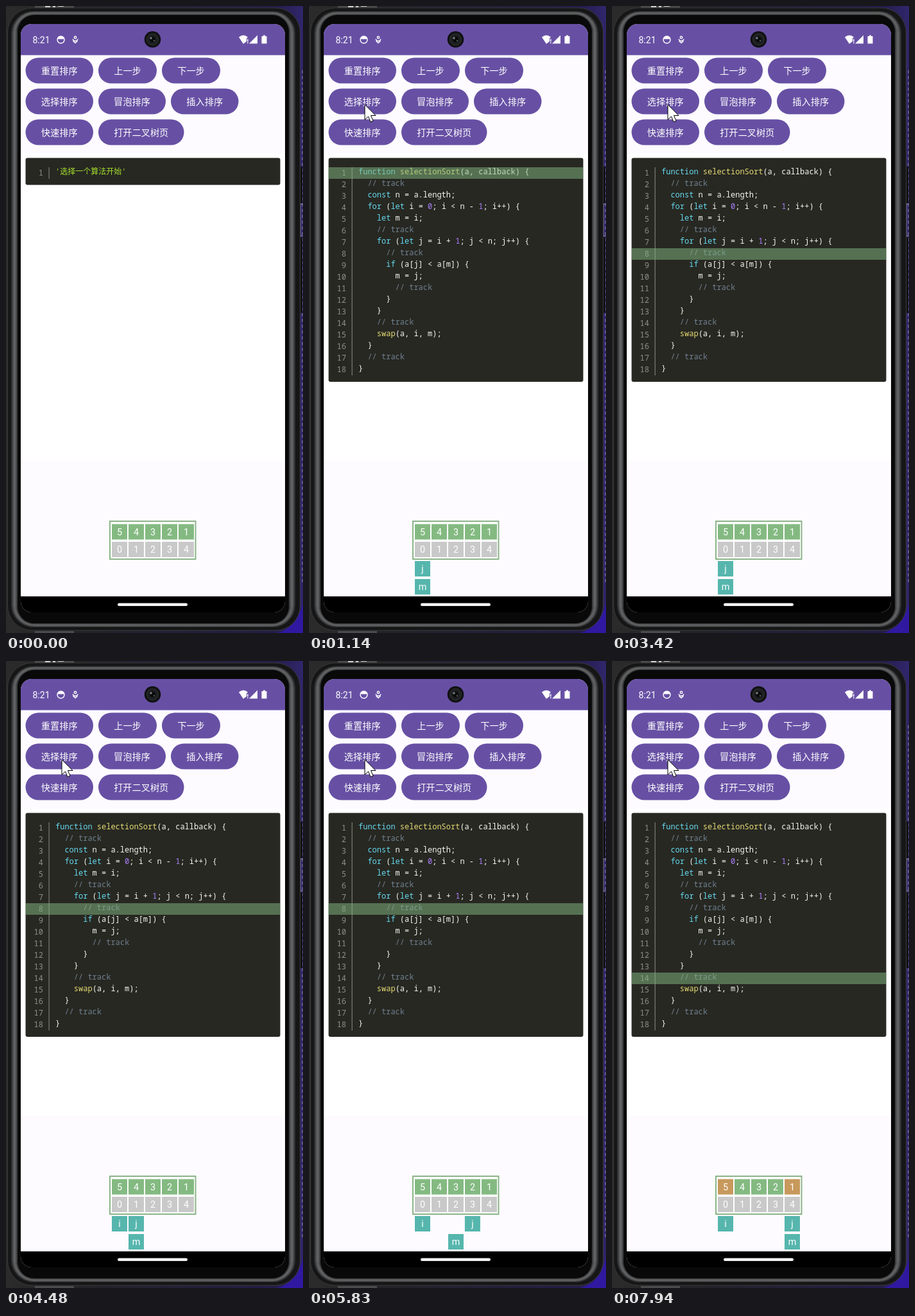
Write an HTML page that moves like this. It is 463x976 px and loops after 8 s.

```html
<!DOCTYPE html>
<html lang="zh">
<head>
<meta charset="utf-8">
<style>
html, body { margin: 0; width: 100%; height: 100%; overflow: hidden; background: #24222f; }
svg { display: block; width: 463px; height: 976px; }
text { white-space: pre; font-family: Roboto, "Noto Sans CJK SC", sans-serif; fill: #fff; }
.label { font-size: 14.2px; text-anchor: middle; font-family: "Noto Sans CJK SC", "Noto Sans CJK", sans-serif; }
.cell { font-size: 14.4px; text-anchor: middle; }
.code { font: 12px "Noto Sans Mono", "Noto Sans CJK SC", monospace; fill: #f8f8f2; }
.num { font: 12px "Noto Sans Mono", monospace; fill: #8f908a; text-anchor: end; }
.comment { fill: #708090; }
.keyword { fill: #66d9ef; }
.call { fill: #e6db74; }
.digit { fill: #ae81ff; }
.string { fill: #a6e22e; }
</style>
</head>
<body>
<svg viewBox="0 0 463 976">
  <defs>
    <linearGradient id="desk" x1="0" y1="0" x2="1" y2="0">
      <stop offset="0" stop-color="#2b2b2b"/><stop offset=".25" stop-color="#232327"/>
      <stop offset=".9" stop-color="#231c48"/><stop offset="1" stop-color="#30266c"/>
    </linearGradient>
    <clipPath id="screen"><rect x="23" y="28" width="412" height="916" rx="17"/></clipPath>
    <clipPath id="press"><rect x="30.500" y="128.500" width="105.500" height="40" rx="20"/></clipPath>
  </defs>

  <!-- desktop and phone body -->
  <rect width="463" height="976" fill="url(#desk)"/>
  <path d="M45 0h61v3h-61zM45 973h61v3h-61z" fill="#4b4b4d"/>
  <path d="M61 0h8v2h-8zM73 0h4v2h-4zM81 0h9v1h-9z" fill="#d0d0d0"/>
  <path d="M463 930v46h-40q30-8 40-46z" fill="#3018a0"/>
  <path d="M462 100V900" stroke="#6c6790" stroke-width="1.500" stroke-dasharray="5 4"/>
  <path d="M457 250h5v57h-5zM457 360h5v118h-5z" fill="#111215"/>
  <path d="M463 308h-4v50h4" fill="none" stroke="#8d8999"/>
  <rect x="2.500" y="3" width="456" height="969" rx="38" fill="#161617" stroke="#3a3a3b"/>
  <g id="rim" fill="none"></g>
  <rect x="18" y="14" width="423" height="947" rx="26" fill="#090909"/>

  <g clip-path="url(#screen)">
    <rect x="23" y="28" width="412" height="916" fill="#fdfbff"/>
    <rect x="23" y="230" width="412" height="478" fill="#fff"/>
    <rect x="23" y="28" width="412" height="48.500" fill="#6750a4"/>
    <rect x="23" y="919" width="412" height="26" fill="#000"/>
  </g>
  <rect x="174" y="929.500" width="109" height="4.500" rx="2.200" fill="#f4f4f4"/>

  <!-- status bar -->
  <text x="41.500" y="58" font-size="14">8:21</text>
  <g fill="none" stroke="#fff" stroke-width="1.400">
    <circle cx="85.500" cy="52.500" r="5.500"/>
    <path d="M81 50.500h9M82 48.500h7" stroke-width="2"/>
    <circle cx="108" cy="49" r="1.700"/>
    <path d="M104 51.500q1 3 4 3t4-3M104.500 54.500l3.500 3 3.500-3"/>
  </g>
  <path d="M363 48.500q7-6 14 0l-2 2v4.500l-5 4zM376 51.500h1.500v4h-1.500zM376 56.500h1.500v1.700h-1.500zM379 58.500L392 45.500V58.500zM398.500 47h2.500V45.500h3v1.500h2.500V58.500h-8z" fill="#fff"/>
  <circle cx="228.500" cy="52" r="12.800" fill="#101112"/>
  <circle cx="228.500" cy="52" r="9" fill="#1d1f20" stroke="#303234"/>
  <circle cx="228.500" cy="52" r="4.500" fill="#090a0b"/>
  <circle cx="226" cy="50" r="1.700" fill="#7d8487"/>
  <circle cx="231" cy="54" r="1.200" fill="#50585b"/>

  <g id="buttons"></g>
  <circle id="ripple" cx="88" cy="153" fill="#fff" clip-path="url(#press)"/>

  <!-- code panel -->
  <rect id="panel" x="30.500" y="236.500" width="397" rx="3" fill="#272822"/>
  <rect id="gutter" x="66.500" y="251" width="1.300" fill="#777872"/>
  <g id="intro">
    <text class="num" x="58" y="264">1</text>
    <text class="code string" x="77" y="262">'选择一个算法开始'</text>
  </g>
  <g id="listing"></g>
  <rect id="mark" x="30.500" width="397" height="18" fill="#84ba82" fill-opacity=".5"/>

  <!-- array -->
  <rect x="162" y="802" width="133.500" height="59" fill="#fff" stroke="#8ab387" stroke-width="2"/>
  <g id="cells"></g>
  <g id="pointers"></g>

  <path id="cursor" d="M0 0V23.500L5.500 18.500 9 27 13 25.300 9.500 17H17z" fill="#fff" stroke="#000" stroke-linejoin="round"/>
</svg>
<script>
const $ = id => document.getElementById(id);
const LOOP = 8000, CODE_AT = 1070, MOVE = 270;
const GREEN = [132, 186, 130], ORANGE = [200, 153, 92];

const source = `function selectionSort(a, callback) {
  // track
  const n = a.length;
  for (let i = 0; i < n - 1; i++) {
    let m = i;
    // track
    for (let j = i + 1; j < n; j++) {
      // track
      if (a[j] < a[m]) {
        m = j;
        // track
      }
    }
    // track
    swap(a, i, m);
  }
  // track
}`;

// [time, highlighted line, pointer that advances]
const steps = [
  [CODE_AT, 1], [1680, 2], [2620, 6], [3420, 8, 'j'], [3950, 11, 'm'],
  [4480, 8, 'j'], [5020, 11, 'm'], [5570, 8, 'j'], [6100, 11, 'm'],
  [6650, 8, 'j'], [7190, 11, 'm'], [7740, 14]
];

// [time, x, y]
const path = [[190, 349, 846], [330, 255, 630], [470, 125, 340], [600, 70, 205], [740, 87, 153.5]];

const clamp = v => Math.max(0, Math.min(1, v));
const ease = v => (v = clamp(v), v * v * (3 - 2 * v));
const escape = s => s.replace(/</g, '&lt;');

function colour(line) {
  const token = /(\/\/.*)|\b(function|const|let|for|if)\b|(\w+(?=\())|\b(\d+)\b/g;
  const kinds = ['comment', 'keyword', 'call', 'digit'];
  return escape(line).replace(token, (s, ...groups) =>
    `<tspan class="${kinds[groups.slice(0, 4).findIndex(Boolean)]}">${s}</tspan>`);
}

function button(x, y, width, label) {
  return `<rect x="${x}" y="${y}" width="${width}" height="40" rx="20" fill="#6750a4"/>
    <text class="label" x="${x + width / 2}" y="${y + 25.5}">${label}</text>`;
}

function cell(x, y, label, fill, id = '') {
  return `<g id="${id}"><rect x="${x}" y="${y}" width="24" height="24" fill="${fill}"/>
    <text class="cell" x="${x + 12}" y="${y + 17}">${label}</text></g>`;
}

// Nested outlines shade the metal edge; it is thinner at the top and bottom.
$('rim').innerHTML = ['#303132', '#4c4d4e', '#646566', '#5a5b5c', '#3b3c3d'].map((stroke, k) => {
  const x = 9 + k * 2, y = 9 + k * 1.2;
  return `<rect x="${x}" y="${y}" width="${459 - 2 * x}" height="${975 - 2 * y}"
    rx="${34 - k * 1.6}" stroke="${stroke}" stroke-width="2.2"/>`;
}).join('');

$('buttons').innerHTML = [
  [30.5, 80.5, 105.5, '重置排序'], [144, 80.5, 91, '上一步'], [243, 80.5, 91, '下一步'],
  [30.5, 128.5, 105.5, '选择排序'], [144, 128.5, 105, '冒泡排序'], [257, 128.5, 105.5, '插入排序'],
  [30.5, 176.5, 105.5, '快速排序'], [144, 176.5, 133.5, '打开二叉树页']
].map(b => button(...b)).join('');

$('listing').innerHTML = source.split('\n').map((line, k) => {
  const y = 262 + k * 18;
  return `<text class="num" x="58" y="${y + 2}">${k + 1}</text>
    <text class="code" x="77" y="${y}">${colour(line)}</text>`;
}).join('');

$('cells').innerHTML = [5, 4, 3, 2, 1].map((value, k) =>
  cell(165 + k * 26, 806.5, value, `rgb(${GREEN})`, 'value' + k) +
  cell(165 + k * 26, 834, k, '#c9c9ca')).join('');

$('pointers').innerHTML = cell(165, 864, 'i', '#56b6ad') +
  cell(165, 864, 'j', '#56b6ad', 'j') + cell(165, 892, 'm', '#56b6ad', 'm');

const swapped = [0, 4].map(k => $('value' + k).firstElementChild);
const show = (id, on) => $(id).setAttribute('display', on ? 'inline' : 'none');
const set = (id, name, value) => $(id).setAttribute(name, value);

function drawCursor(t) {
  show('cursor', t >= path[0][0]);
  let k = 0;
  while (k < path.length - 2 && t >= path[k + 1][0]) k++;
  const [t0, x0, y0] = path[k], [t1, x1, y1] = path[k + 1];
  const p = clamp((t - t0) / (t1 - t0));
  set('cursor', 'transform', `translate(${x0 + (x1 - x0) * p} ${y0 + (y1 - y0) * p})`);
}

function draw(t) {
  const open = t >= CODE_AT;
  show('intro', !open);
  for (const id of ['listing', 'mark', 'pointers']) show(id, open);
  set('panel', 'height', open ? 348.5 : 42);
  set('gutter', 'height', open ? 324 : 18);

  const current = steps.filter(s => t >= s[0]).pop();
  if (current) set('mark', 'y', 233 + current[1] * 18);

  for (const id of ['j', 'm']) {
    const moved = steps.reduce((sum, [at, , who]) => who === id ? sum + ease((t - at) / MOVE) : sum, 0);
    set(id, 'transform', `translate(${moved * 26} 0)`);
  }

  const heat = ease((t - 7740) / 200);
  const tone = GREEN.map((c, k) => Math.round(c + (ORANGE[k] - c) * heat));
  swapped.forEach(r => r.setAttribute('fill', `rgb(${tone})`));

  set('ripple', 'r', 55 * ease((t - 930) / 150));
  set('ripple', 'opacity', .12 * clamp((t - 930) / 60) * clamp((1140 - t) / 100));
  drawCursor(t);
}

const start = performance.now();
function tick() {
  draw((performance.now() - start) % LOOP);
  requestAnimationFrame(tick);
}
tick();
</script>
</body>
</html>
```
